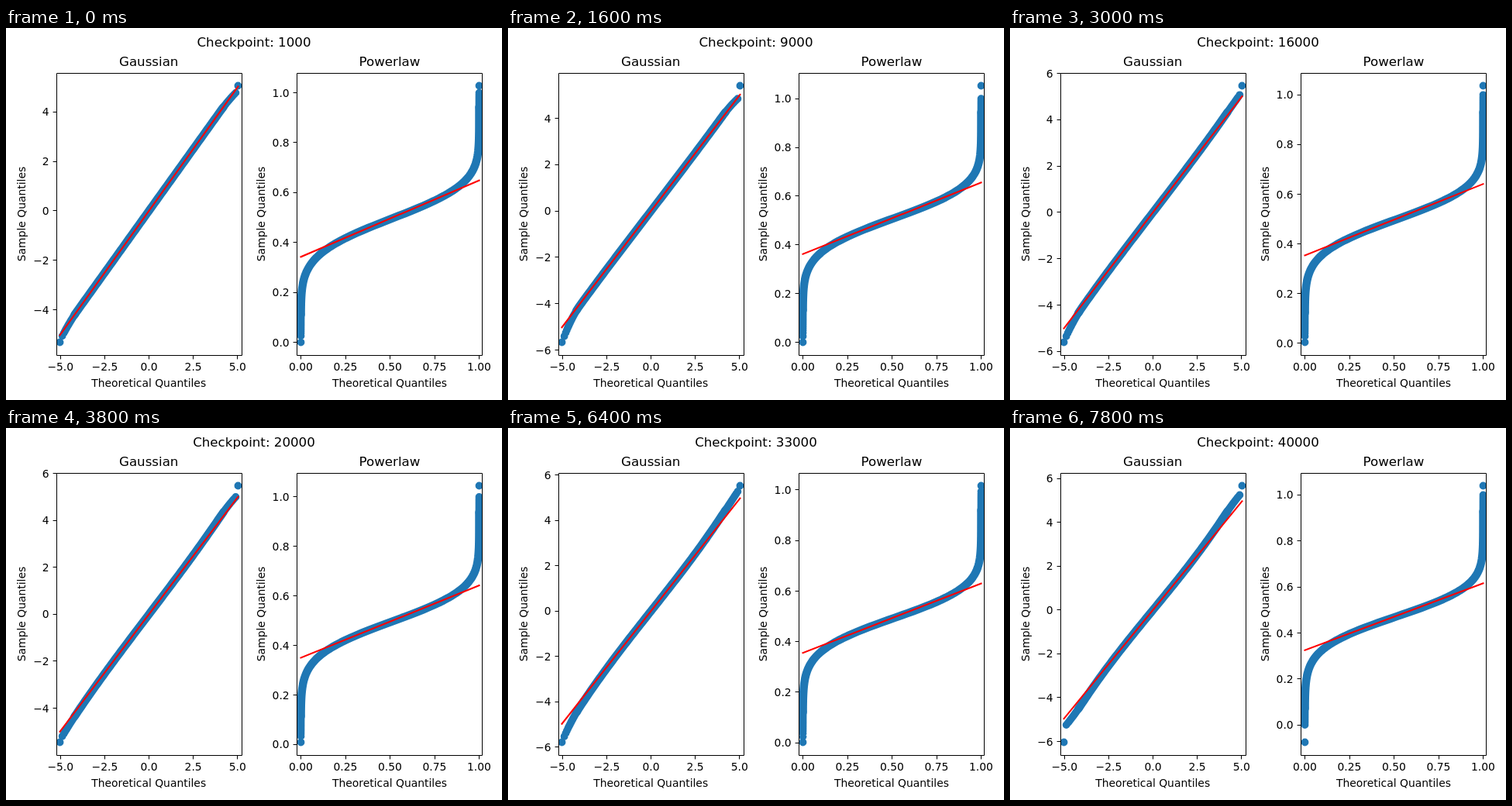
Write an HTML page that moves like this. It is 640 px wide and 480 px high and loops after 8000 ms.

```html
<!DOCTYPE html>
<html lang="en">
<head>
<meta charset="utf-8">
<title>Quantile plots</title>
<style>
  html, body { margin: 0; width: 100%; height: 100%; overflow: hidden; background: #fff; }
  svg { display: block; width: 640px; height: 480px; font: 13.89px "DejaVu Sans", sans-serif; }
  text { text-anchor: middle; }
  .title { font-size: 16.67px; }
  .end { text-anchor: end; }
  .axis { fill: none; stroke: #000; }
  .band, .dots { fill: none; stroke: #1f77b4; stroke-width: 10.5; stroke-linecap: round; stroke-linejoin: round; }
  .dots { stroke-width: 9.8; }
  .fit { stroke: #f00; stroke-width: 2.08; stroke-linecap: square; }
</style>
</head>
<body>
<svg id="stage" viewBox="0 0 640 480"></svg>
<script>
const STEP = 200, STEPS = 40;
const TOP = 58, BOTTOM = 422, MARGIN = 16.5;
const Z_MAX = 5.03, Z_NEXT = 4.9, Z_TAIL = 4, Z_LINE = 4.2;
const QUARTILE = .6745, EXPONENT = 1.45;

// Both panels show one sample: its extremes in sigmas, then its mean and sigma on the unit scale.
const KEYS = [
  { n: 0, low: 5.32, high: 5.06, mean: .527, sigma: .099 },
  { n: 8, low: 5.66, high: 5.4, mean: .539, sigma: .0952 },
  { n: 12, low: 5.72, high: 5.46, mean: .527, sigma: .0921 },
  { n: 19, low: 5.45, high: 5.47, mean: .526, sigma: .0949 },
  { n: 25, low: 5.67, high: 5.26, mean: .497, sigma: .0956 },
  { n: 32, low: 5.79, high: 5.53, mean: .521, sigma: .0896 },
  { n: 39, low: 6.04, high: 5.67, mean: .5, sigma: .0952 }
];

const snap = v => Math.floor(v) + .5;
const label = (v, digits) => v.toFixed(digits).replace("-", "\u2212");
const text = (x, y, s, cls = "") => `<text x="${x}" y="${y}" class="${cls}">${s}</text>`;
const at = p => p.map(v => v.toFixed(2)).join(" ");
const normalCdf = z => 1 / (1 + Math.exp(-1.5976 * z - .07056 * z ** 3));
const powerQuantile = z => normalCdf(z) ** (1 / EXPONENT);
// Expected quantile of the i-th most extreme value
const tailZ = i => Math.sqrt(Z_MAX ** 2 - 1.92 * Math.log(i));

function stateAt(n) {
  const i = Math.max(1, KEYS.findIndex(key => key.n >= n));
  const a = KEYS[i - 1], b = KEYS[i], k = (n - a.n) / (b.n - a.n);
  const mix = name => a[name] + (b[name] - a[name]) * k;
  return { low: mix("low"), high: mix("high"), mean: mix("mean"), sigma: mix("sigma") };
}

// Sample value in sigmas for a normal quantile z; the tails grow heavier with n.
function sampler(n, { low, high, mean, sigma }) {
  const bend = .005 * n / (STEPS - 1);
  const core = z => (1 - 3 * bend) * z + bend * z ** 3;
  const tail = (z, extreme, bound) => {
    if (z >= Z_MAX) return extreme;
    const next = Math.min(bound, extreme - .25);
    const pull = Math.max(0, (z - Z_TAIL) / (Z_NEXT - Z_TAIL)) ** 2;
    return core(z) + (next - core(Z_NEXT)) * pull;
  };
  return z => z < 0 ? -tail(-z, low, mean / sigma) : tail(z, high, (1 - mean) / sigma);
}

function panel({ left, middle, labelX, title, ticks, xDigits, toX, yStep, yDigits, quantile, value }) {
  const low = value(-Z_MAX), perUnit = (BOTTOM - TOP - 2 * MARGIN) / (value(Z_MAX) - low);
  const toY = v => BOTTOM - MARGIN - (v - low) * perUnit;
  const point = z => [toX(quantile(z)), toY(value(z))];

  const line = [];
  for (let z = -Z_LINE; z <= Z_LINE + .01; z += .1) line.push(at(point(z)));
  let dots = "";
  for (let i = 1; i <= 60; i++) {
    for (const side of [-1, 1]) dots += `M${at(point(side * tailZ(i)))}h.01`;
  }

  // The fit runs through both quartiles.
  const q1 = quantile(-QUARTILE), q3 = quantile(QUARTILE), v1 = value(-QUARTILE);
  const slope = (value(QUARTILE) - v1) / (q3 - q1);
  const [x1, x2] = [quantile(-Z_MAX), quantile(Z_MAX)];
  const fitY = x => toY(v1 + slope * (x - q1));

  let marks = "", labels = "";
  for (const v of ticks) {
    marks += `M${snap(toX(v))} 422.5v4.9`;
    labels += text(toX(v), 442, label(v, xDigits));
  }
  for (let k = -5; k <= 6; k++) {
    const v = k * yStep, y = toY(v);
    if (y < TOP || y > BOTTOM) continue;
    marks += `M${left + .5} ${snap(y)}h-4.9`;
    labels += text(left - 9.3, Math.round(y + 5.15), label(v, yDigits), "end");
  }

  return `<clipPath id="clip${left}"><rect x="${left + .5}" y="58.5" width="239" height="364"/></clipPath>
    <g clip-path="url(#clip${left})">
      <path class="band" d="M${line.join("L")}"/><path class="dots" d="${dots}"/>
      <line class="fit" x1="${toX(x1)}" y1="${fitY(x1)}" x2="${toX(x2)}" y2="${fitY(x2)}"/>
    </g>
    <path class="axis" d="M${left + .5} 58.5h239v364h-239z${marks}"/>${labels}
    ${text(middle, 49, title, "title")}${text(middle, 463, "Theoretical Quantiles")}
    <text transform="translate(${labelX} 240) rotate(-90)">Sample Quantiles</text>`;
}

function plots(n) {
  const state = stateAt(n), sample = sampler(n, state);
  return panel({
    left: 65, middle: 184.2, labelX: 25, title: "Gaussian",
    ticks: [-5, -2.5, 0, 2.5, 5], xDigits: 1, toX: x => 184.5 + 22.85 * x,
    yStep: 2, yDigits: 0, quantile: z => z, value: sample
  }) + panel({
    left: 375, middle: 495, labelX: 334, title: "Powerlaw",
    ticks: [0, .25, .5, .75, 1], xDigits: 2, toX: x => 380.5 + 230 * x,
    yStep: .2, yDigits: 1, quantile: powerQuantile,
    value: z => state.mean + state.sigma * sample(z)
  });
}

const stage = document.getElementById("stage");
const began = performance.now();
let shown = -1;

function tick() {
  const n = Math.floor((performance.now() - began) / STEP) % STEPS;
  if (n !== shown) {
    shown = n;
    stage.innerHTML = text(320, 24, `Checkpoint: ${(n + 1) * 1000}`, "title") + plots(n);
  }
  requestAnimationFrame(tick);
}
tick();
</script>
</body>
</html>
```
